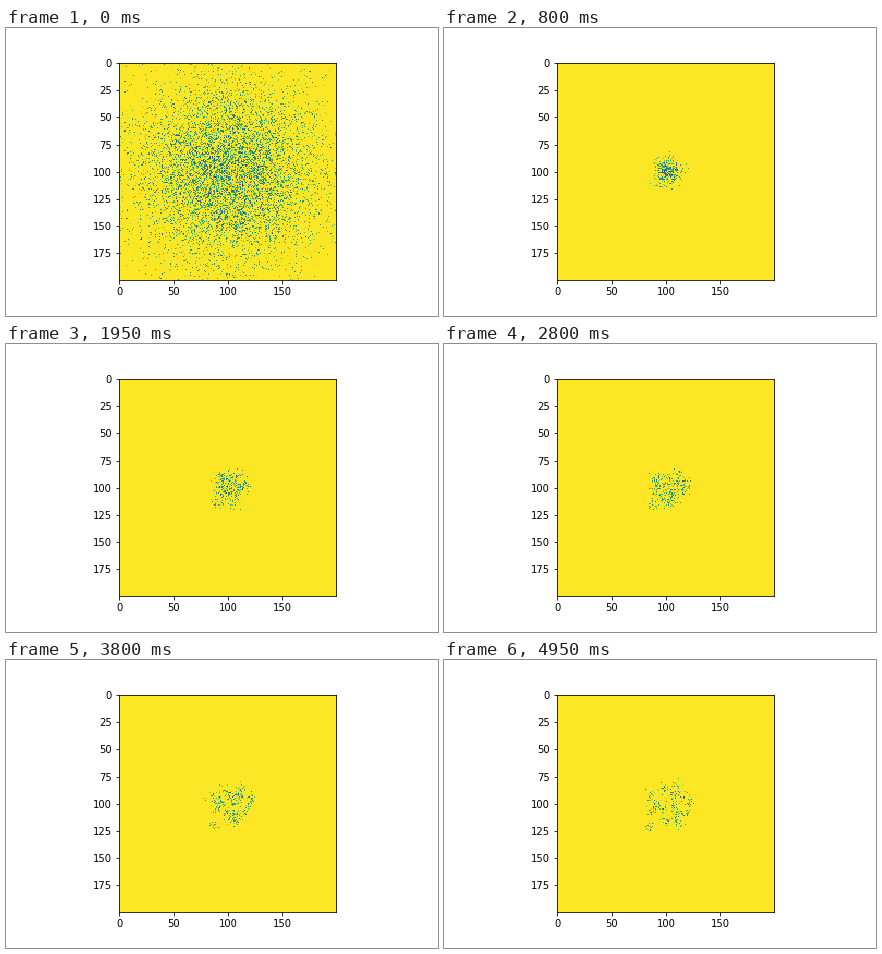
A matplotlib script for the animation above (5000 ms loop, 432 by 288 pixels).

```python
import numpy as np
import matplotlib.pyplot as plt
from matplotlib.animation import FuncAnimation

SIZE = 200
FRAMES = 100
COLONIES = 14
CELLS = 340
GOLDEN_ANGLE = np.pi * (3 - np.sqrt(5))
rng = np.random.default_rng(7)


def stamp(grid, points):
    """Darken the cell under each point; shared cells get darker."""
    x, y = np.rint(points).astype(int).T
    shade = rng.uniform(0.35, 0.95, len(points))
    inside = (x >= 0) & (x < SIZE) & (y >= 0) & (y < SIZE)
    np.multiply.at(grid, (y[inside], x[inside]), shade[inside])


def colony_centres(n):
    """Sunflower layout that grows outwards, with a tail at the lower left."""
    growth = np.clip((n - 12) / (FRAMES - 12), 0, 1) ** 0.6
    radius = 7 + 14 * growth
    i = np.arange(COLONIES)
    angle = i * GOLDEN_ANGLE + 0.15 * np.sin(n / 15 + i)
    reach = np.sqrt((i + 0.5) / COLONIES)
    layout = np.column_stack([np.cos(angle), np.sin(angle)]) * reach[:, None]
    layout = np.vstack([layout, [-0.85, 1.0]])
    middle = np.array([101, 99]) + growth * np.array([1.5, 2.5])
    return middle + radius * layout, 4 - 1.4 * growth


def build_grids():
    colony = np.arange(CELLS) % (COLONIES + 1)
    offsets = rng.normal(size=(CELLS, 2))
    grids = []
    for n in range(FRAMES):
        grid = np.ones((SIZE, SIZE))
        if n < 7:
            count, sigma = int(8500 * 0.4 ** n), 43 * 0.72 ** n
            stamp(grid, rng.normal(SIZE / 2, sigma, (count, 2)))
        if n > 0:
            renew = rng.random(CELLS) < 0.4
            offsets[renew] = rng.normal(size=(renew.sum(), 2))
            centres, spread = colony_centres(n)
            alive = CELLS - n // 2
            stamp(grid, (centres[colony] + spread * offsets)[:alive])
        grids.append(grid)
    return grids


grids = build_grids()
fig, ax = plt.subplots(figsize=(6, 4), dpi=72)
fig.subplots_adjust(left=0.125, right=0.9, bottom=0.125, top=0.88)
image = ax.imshow(grids[0], cmap="viridis", vmin=0, vmax=1,
                  interpolation="nearest")


def update(n):
    image.set_data(grids[n])
    return [image]


anim = FuncAnimation(fig, update, frames=FRAMES, interval=50, repeat=True,
                     repeat_delay=0)
plt.show()
```
